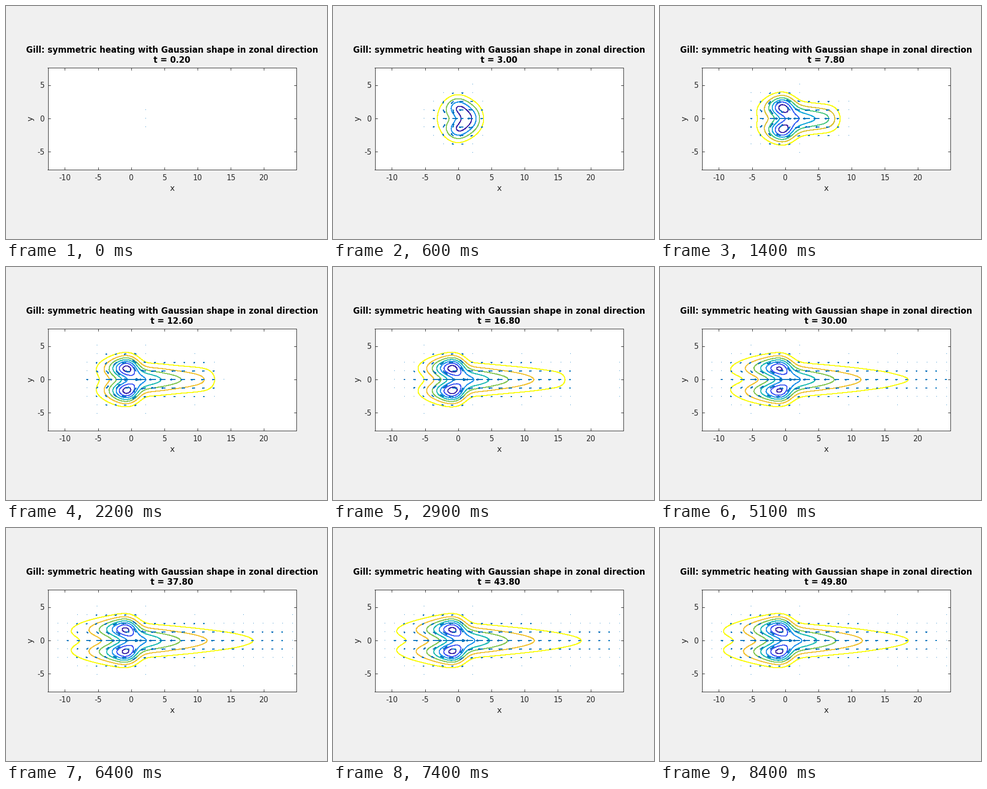
Write a matplotlib script that moves like this. It is 640 px wide and 464 px high and loops after 8.5 s.

```python
import numpy as np
import matplotlib.pyplot as plt
from matplotlib.animation import FuncAnimation
from matplotlib.colors import LinearSegmentedColormap

W, H, DPI = 640, 464, 80
FRAMES, INTERVAL = 85, 100
LEFT, RIGHT, TOP, BOTTOM = 83.5, 578.5, 122.5, 326.0
INK = "#262626"
EPS, STEP = 0.1, 0.2

parula = LinearSegmentedColormap.from_list("parula", [
    (0.242, 0.150, 0.660), (0.281, 0.323, 0.958), (0.179, 0.529, 0.968),
    (0.069, 0.695, 0.839), (0.216, 0.784, 0.592), (0.672, 0.779, 0.223),
    (0.997, 0.766, 0.220), (0.977, 0.984, 0.081)])


def pt(px):
    return px * 72 / DPI


# Grid: periodic in x, parabolic cylinder functions in y
N, LX = 128, 12 * np.pi
x = -4 * np.pi + LX / N * np.arange(N)
scale = (RIGHT - LEFT) / (x[-1] - x[0])
ymax = (BOTTOM - TOP) / scale / 2
y = np.linspace(-ymax, ymax, 61)
Y = y[:, None]
D0 = np.exp(-Y**2 / 4)

# Linear modes excited by the heating: Kelvin wave and first Rossby triple
k = 2 * np.pi * np.fft.fftfreq(N, LX / N)
shift = np.exp(-1j * k * x[0])
heat = np.fft.fft(np.exp(-x**2 / 2))
kelvin = -EPS - 1j * k
A = np.zeros((N, 3, 3), complex)
A[:, 0, 0] = -EPS - 1j * k
A[:, 0, 1] = 1
A[:, 1, 0] = -1
A[:, 1, 1] = -EPS
A[:, 1, 2] = 0.5
A[:, 2, 1] = -1
A[:, 2, 2] = -EPS + 1j * k
lam, vec = np.linalg.eig(A)
force = np.zeros((N, 3, 1), complex)
force[:, 2, 0] = -heat
coef = np.linalg.solve(vec, force)[:, :, 0]


def fields(t):
    """Pressure and wind at time t, starting from rest."""
    def back(spec):
        return np.fft.ifft(spec).real

    q0 = back(-heat * (np.exp(kelvin * t) - 1) / kelvin)
    amp = coef * (np.exp(lam * t) - 1) / lam
    q2, v1, r0 = (back(m) for m in np.einsum("nij,nj->in", vec, amp))
    q = (q0 + q2 * (Y**2 - 1)) * D0
    r = r0 * D0
    return (q + r) / 2, (q - r) / 2, v1 * Y * D0


fig = plt.figure(figsize=(W / DPI, H / DPI), dpi=DPI, facecolor="#f0f0f0")
ax = fig.add_axes([LEFT / W, 1 - BOTTOM / H,
                   (RIGHT - LEFT) / W, (BOTTOM - TOP) / H])
ax.set_xlim(x[0], x[-1])
ax.set_ylim(-ymax, ymax)
ax.set_xticks(range(-10, 21, 5))
ax.set_yticks([-5, 0, 5])
ax.tick_params(direction="in", top=True, right=True, length=pt(5),
               width=pt(1), color=INK, labelbottom=False, labelleft=False)
for spine in ax.spines.values():
    spine.set_linewidth(pt(1))
    spine.set_color(INK)


def label(px, py, text, size, **kw):
    kw = {"ha": "center", "va": "baseline", "color": INK, **kw}
    return fig.text(px / W, 1 - py / H, text, fontsize=pt(size),
                    family="DejaVu Sans", **kw)


for v in range(-10, 21, 5):
    label(LEFT + (v - x[0]) * scale, 347, f"{v}", 14.67)
for v in (-5, 0, 5):
    label(77, 229.5 - v * scale, f"{v}", 14.67, ha="right")
label(331.5, 368.5, "x", 16.2)
label(49, 224, "y", 16.2, rotation=90, va="center")
label(331, 93, "Gill: symmetric heating with Gaussian shape in zonal direction",
      16.5, weight="bold", color="black")
clock = label(331, 113, "", 16.5, weight="bold", color="black")

WIND = "#0072bd"
arrows, = ax.plot([], [], color=WIND, lw=pt(1), antialiased=False, zorder=4)
dots, = ax.plot([], [], ",", color=WIND, zorder=4)

gx, gy = np.meshgrid(x[::5], y[::5])
# Columns lying on a pixel edge show even the faintest wind
on_edge = np.arange(gx.shape[1]) % 5 == 0
faint = np.broadcast_to(np.where(on_edge, 0.03, 0.36), gx.shape)
contours = []


def draw_wind(u, v):
    u, v = u[::5, ::5], v[::5, ::5]
    size = np.hypot(u, v) * scale
    dot = (size > faint) & (size < 1)
    dots.set_data(gx[dot], gy[dot])
    big = size >= 1
    bx, by, u, v = gx[big], gy[big], u[big], v[big]
    tx, ty = bx + u, by + v
    a, b = 0.2, 0.4
    gap = np.full_like(bx, np.nan)
    xs = [bx, tx, gap, tx - a * (u + b * v), tx, tx - a * (u - b * v), gap]
    ys = [by, ty, gap, ty - a * (v - b * u), ty, ty - a * (v + b * u), gap]
    arrows.set_data(np.array(xs).T.ravel(), np.array(ys).T.ravel())


def draw_pressure(p):
    while contours:
        contours.pop().remove()
    n = int(-p.min() / STEP)
    if n == 0:
        return
    levels = -STEP * np.arange(n, 0, -1)
    shades = np.linspace(0, 1, n) if n > 1 else [0.5]
    contours.append(ax.contour(x, y, p, levels=levels, colors=parula(shades),
                               linestyles="solid", linewidths=pt(1.05),
                               antialiased=False, zorder=2))


def update(i):
    t = max(0.2, 0.6 * (i - 1))
    p, u, v = fields(t)
    draw_pressure(p)
    draw_wind(u, v)
    clock.set_text(f"t = {t:.2f}")
    return arrows, dots, clock


anim = FuncAnimation(fig, update, frames=FRAMES, interval=INTERVAL,
                     repeat=True, repeat_delay=0, blit=False)
plt.show()
```
